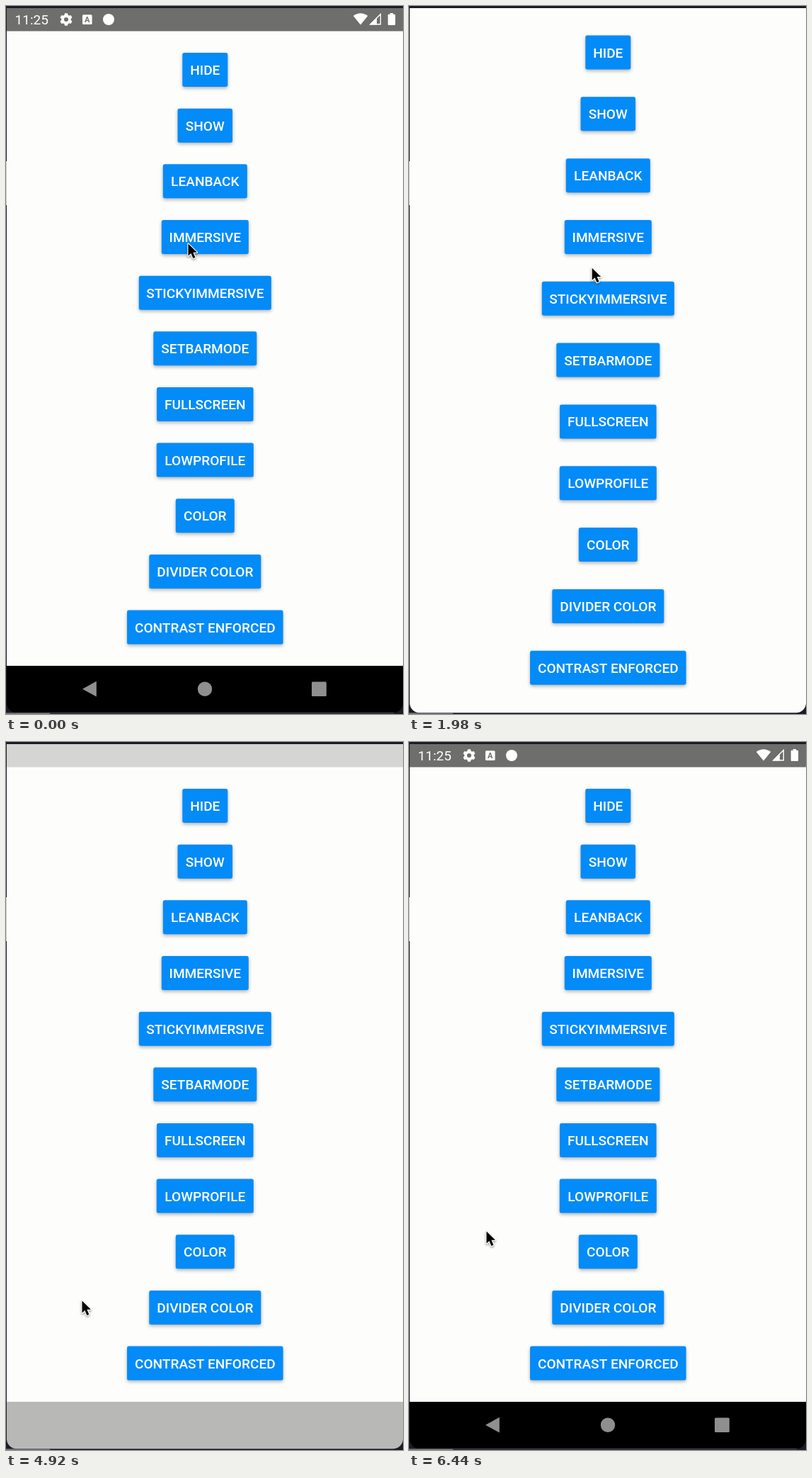
Animation of 561 by 999 pixels, one loop 6460 ms. Source, as an HTML page with a canvas:

```html
<!DOCTYPE html>
<html lang="en">
<head>
<meta charset="utf-8">
<title>System bars demo</title>
<style>
html, body { margin: 0; width: 100%; height: 100%; overflow: hidden; background: #fdfdfb; }
canvas { display: block; }
</style>
</head>
<body>
<canvas id="stage" width="561" height="999"></canvas>
<script>
const ctx = document.getElementById('stage').getContext('2d');
const W = 561, H = 999, LOOP = 6460, MID = 281.3;
const TOP = 3, BOTTOM = 997, STATUS_END = 35.5, NAV_TOP = 931;
const PAPER = '#fdfdfb', BLUE = '#038bf8', FRAME = '#1e1a24';

const BUTTONS = [
  ['HIDE', 64], ['SHOW', 77.5], ['LEANBACK', 119], ['IMMERSIVE', 123],
  ['STICKYIMMERSIVE', 187], ['SETBARMODE', 146], ['FULLSCREEN', 136.5],
  ['LOWPROFILE', 137], ['COLOR', 83], ['DIVIDER COLOR', 158], ['CONTRAST ENFORCED', 220.5]
];

// Pointer path: step, x, y
const PATH = [
  [1, 257, 335], [8, 257, 335], [14, 262, 331], [20, 264, 329], [27, 267, 325],
  [40, 267, 326], [45, 256, 380], [52, 200, 640], [58, 155, 830], [63, 140, 881],
  [70, 124, 945], [76, 115, 971], [92, 114, 972], [98, 113, 966], [103, 109, 880],
  [107, 107, 788], [111, 107, 725], [117, 107, 702], [125, 108, 692], [139, 109, 690]
];

const clamp = v => Math.max(0, Math.min(1, v));
const ramp = (n, a, b) => clamp((n - a) / (b - a));

function stepAt(ms) {
  const t = ms % LOOP + 20, r = t % 140;
  return Math.floor(t / 140) * 3 + (r < 20 ? 0 : r < 40 ? 1 : 2);
}

function pointer(n) {
  let i = 1;
  while (i < PATH.length - 1 && PATH[i][0] < n) i++;
  const [a, ax, ay] = PATH[i - 1], [b, bx, by] = PATH[i];
  const k = ramp(n, a, b);
  return [ax + (bx - ax) * k, ay + (by - ay) * k];
}

function rect(x, y, w, h, color) {
  ctx.fillStyle = color;
  ctx.fillRect(x, y, w, h);
}

function round(x, y, w, h, r, color) {
  ctx.fillStyle = color;
  ctx.beginPath();
  ctx.roundRect(x, y, w, h, r);
  ctx.fill();
}

function disc(x, y, r, color) {
  ctx.fillStyle = color;
  ctx.beginPath();
  ctx.arc(x, y, r, 0, 7);
  ctx.fill();
}

function poly(points, color) {
  ctx.fillStyle = color;
  ctx.beginPath();
  points.forEach(([x, y]) => ctx.lineTo(x, y));
  ctx.closePath();
  ctx.fill();
}

function text(s, x, y, font, align, color) {
  ctx.font = font + ' Roboto, sans-serif';
  ctx.textAlign = align;
  ctx.fillStyle = color;
  ctx.fillText(s, x, y);
}

function shadow(color, blur, dy) {
  ctx.shadowColor = color;
  ctx.shadowBlur = blur;
  ctx.shadowOffsetY = dy;
}

function drawButtons(n, first, gap) {
  BUTTONS.forEach(([label, w], i) => {
    const x = MID - w / 2, y = first + i * gap;
    ctx.save();
    shadow('rgba(0,0,0,.3)', 5, 2.2);
    round(x, y, w, 48, 2.7, BLUE);
    ctx.restore();
    if (label === 'IMMERSIVE') drawRipple(n, x, y, w);
    text(label, MID, y + 31, '500 19.1px', 'center', '#fff');
  });
}

function drawRipple(n, x, y, w) {
  if (n < 21 || n > 36) return;
  ctx.save();
  ctx.beginPath();
  ctx.roundRect(x, y, w, 48, 2.7);
  ctx.clip();
  ctx.globalAlpha = 1 - ramp(n, 29, 36);
  disc(264, y + 24, 20 + 46 * ramp(n, 21, 28) + 20 * ramp(n, 28, 29), 'rgba(0,0,0,.14)');
  ctx.restore();
}

function drawGear(x, y) {
  ctx.save();
  ctx.translate(x, y);
  for (let i = 0; i < 6; i++) {
    poly([[-3, -5], [-1.9, -8.7], [1.9, -8.7], [3, -5]], '#fff');
    ctx.rotate(Math.PI / 3);
  }
  ctx.strokeStyle = '#fff';
  ctx.lineWidth = 3.7;
  ctx.beginPath();
  ctx.arc(0, 0, 4.9, 0, 7);
  ctx.stroke();
  ctx.restore();
}

function drawStatus(alpha, slide) {
  rect(0, TOP, W, STATUS_END - TOP, `rgba(0,0,0,${0.565 * alpha})`);
  if (slide >= 1) return;
  ctx.save();
  ctx.beginPath();
  ctx.rect(0, TOP, W, STATUS_END - TOP);
  ctx.clip();
  ctx.translate(0, -33 * slide);
  text('11:25', 12.5, 26.2, '400 19.1px', 'left', '#fff');
  drawGear(85, 19);
  round(108, 12.3, 13.6, 13.6, 1.5, '#fff');
  text('A', 114.8, 23.2, '700 11px', 'center', '#6f6f6f');
  disc(145, 19, 8, '#fff');
  ctx.fillStyle = '#fff';
  ctx.beginPath();
  ctx.moveTo(501, 26.5);
  ctx.lineTo(490.8, 14);
  ctx.quadraticCurveTo(501, 6.5, 511.2, 14);
  ctx.fill();
  poly([[513.5, 26.5], [524, 16], [524, 26.5]], '#fff');
  ctx.strokeStyle = '#fff';
  ctx.lineWidth = 1.4;
  ctx.beginPath();
  ctx.moveTo(515, 25.8);
  ctx.lineTo(529.3, 11.5);
  ctx.lineTo(529.3, 25.8);
  ctx.closePath();
  ctx.stroke();
  round(539.7, 11.8, 10.4, 15.2, 1.2, '#fff');
  rect(542.7, 10, 4.4, 2.5, '#fff');
  ctx.restore();
}

function drawNav(alpha, slide, top) {
  rect(0, top, W, BOTTOM - top, `rgba(0,0,0,${alpha})`);
  if (slide >= 1) return;
  ctx.save();
  ctx.beginPath();
  ctx.rect(0, NAV_TOP, W, BOTTOM - NAV_TOP);
  ctx.clip();
  ctx.translate(0, 67 * slide);
  shadow('rgba(0,0,0,.15)', 2, 0.8);
  const c = 'rgba(255,255,255,.56)';
  poly([[108, 963.7], [127.8, 952.8], [127.8, 974.6]], c);
  disc(281, 963.7, 10.2, c);
  round(432, 953.5, 20.8, 20.5, 1.6, c);
  ctx.restore();
}

function drawFrame() {
  rect(0, 0, W, TOP, FRAME);
  rect(0, 0, 1, H, FRAME);
  rect(0, 219, 1, 62, '#cfcdc0');
  // Everything outside the rounded bottom edge
  ctx.fillStyle = FRAME;
  ctx.beginPath();
  ctx.rect(0, 960, W, 39);
  ctx.roundRect(1, 900, 560, 97.3, [0, 0, 14, 14]);
  ctx.save();
  ctx.clip('evenodd');
  rect(0, 980, W, 19, FRAME);
  rect(0, 997.3, 62, 2, '#77757a');
  ctx.restore();
}

function drawPointer(x, y) {
  ctx.save();
  ctx.translate(x, y);
  ctx.lineJoin = 'round';
  ctx.lineWidth = 2.4;
  ctx.strokeStyle = '#fff';
  const arrow = [[.5, .5], [.5, 17.6], [4.4, 14], [7.4, 21], [10.4, 19.7], [7.4, 12.8], [13, 12.8]];
  ctx.beginPath();
  arrow.forEach(([px, py]) => ctx.lineTo(px, py));
  ctx.closePath();
  shadow('rgba(0,0,0,.4)', 3, 1.5);
  ctx.stroke();
  shadow('transparent', 0, 0);
  poly(arrow, '#000');
  ctx.restore();
}

function draw(n) {
  const shifted = n >= 26 && n < 29;
  const full = n >= 29 && n < 103;
  const hiding = n < 60;
  const alpha = hiding ? 1 - ramp(n, 21, 27.15) : ramp(n, 102.8, 118);
  const slide = hiding ? ramp(n, 26, 33) ** 2 : (1 - ramp(n, 107, 120)) ** 2.4;

  rect(0, 0, W, H, PAPER);
  if (full) drawButtons(n, 41.5, 86.82);
  else drawButtons(n, shifted ? 33.4 : 66, 78.66);
  if (!full) {
    if (!shifted) drawStatus(alpha, slide);
    drawNav(alpha, slide, shifted ? 897 : NAV_TOP);
  }
  drawFrame();
  drawPointer(...pointer(n));
}

const start = performance.now();
function tick() {
  draw(stepAt(performance.now() - start));
  requestAnimationFrame(tick);
}
tick();
</script>
</body>
</html>
```
